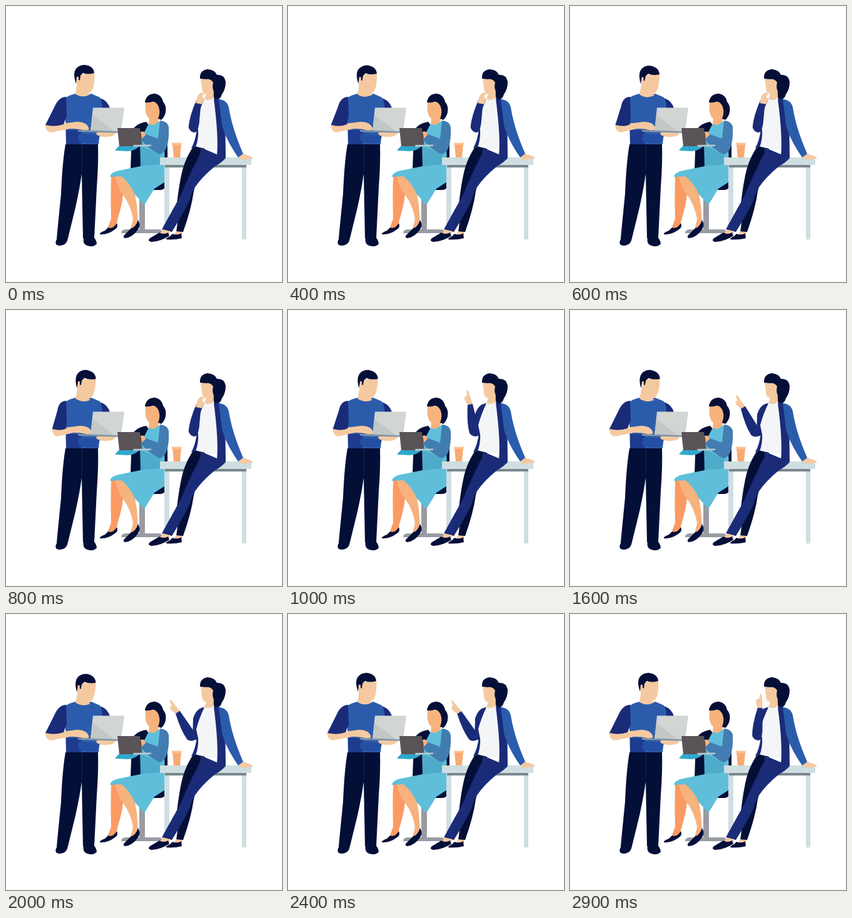
An HTML page for the animation above (3000 ms loop, 441 px wide and 441 px high).

```html
<!DOCTYPE html>
<html lang="en">
<head>
<meta charset="utf-8">
<title>Team at a desk</title>
<style>
html, body { margin: 0; height: 100%; overflow: hidden; background: #fff; }
svg { display: block; width: 100%; height: 100%; }
.ink { fill: #040f38; }
.navy { fill: #1a2b78; }
.shirt { fill: #2b5cab; }
.pale { fill: #f5c9a0; }
.peach { fill: #f7b27d; }
.tan { fill: #fb9b63; }
.steel { fill: #cfdee1; }
.sky { fill: #5fbfda; }
</style>
</head>
<body>
<svg viewBox="0 0 441 441">
  <!-- Standing man -->
  <g>
    <path class="ink" d="M95 221H147Q148 250 145 290L141 371H123L121 268Q118 290 111 322L99 371H81Q84 340 88 300Q90 250 95 221Z"/>
    <path fill="#1d284f" d="M120.500 222H121.500V264H120.500Z"/>
    <path class="ink" d="M82 370H99Q98 382 86 383Q77 382 80 375ZM124 369H140Q145 375 145 380Q140 386 130 383Q122 381 124 369Z"/>
    <path class="navy" d="M148 147Q161 149 166 163H144Z"/>
    <path class="shirt" d="M94 147Q102 142 111 140Q123 147 136 140L150 146Q155 155 154 164L148 221H96Z"/>
    <path fill="#1f3b8f" d="M96 198H120V221H96Z"/>
    <path fill="#2450a3" d="M117 204L151 206L144 219Q130 221 118 217Q113 211 117 204Z"/>
    <g id="head">
      <path class="pale" d="M112 112L141 104Q142 118 140 128Q138 138 131 139L135 141Q123 148 111 141L113 126Z"/>
      <path class="ink" d="M112 124Q106 108 112 100Q117 94 126 94Q140 96 141 107Q131 110 123 107L119 111L118 119L116 118Q117 112 113 113Z"/>
    </g>
    <path class="pale" d="M145 202Q160 198 175 203Q174 208 163 209Q150 210 144 205Z"/>
    <path class="pale" id="forearm"/>
    <path class="navy" id="sleeve"/>
    <path fill="#d1d6d5" d="M139 162.500H189L184 200H135Z"/>
    <path fill="#c2c8c6" d="M138 174L172 200H135Z"/>
    <path fill="#8195a8" d="M114 198L186 200.500V203L116 201Z"/>
  </g>

  <!-- Seated woman -->
  <g>
    <path class="ink" d="M224 185Q202 189 201 205L199 262H224L228 190ZM254 215H258V244H250ZM236 274H254V290Q252 294 245 294H232Z"/>
    <path fill="#989ca2" d="M213 300H222V357H246Q250 358 250 363H184Q184 358 190 357H213Z"/>
    <path class="tan" d="M168 270H188Q189 302 183 324L176 350Q170 356 161 359L168 340Q167 310 168 270Z"/>
    <path class="peach" d="M174 271H194L206 300L209 318L211 344Q208 355 198 362L203 340Q199 318 188 303Q177 290 174 271Z"/>
    <path class="ink" d="M163 354Q171 357 177 347Q180 353 174 357Q162 366 150 365Q149 362 158 359ZM200 355Q207 354 211 342Q216 350 211 357Q202 370 190 371Q185 369 191 364Z"/>
    <path class="sky" d="M228 188Q236 190 245 184L252 190L254 254V281L237 292L221 318L206 301Q196 280 184 272L166 273Q167 266 180 263L215 256L214 215Z"/>
    <path fill="#4eabc9" d="M215 224L246 236L248 253L215 256Z"/>
    <path class="peach" d="M223 154L246 153L244 183Q237 194 228 188L229 180Q221 174 223 154Z"/>
    <path class="ink" d="M222 154Q224 140 238 140Q249 142 251 153Q257 160 255 170Q253 178 248 182L243 180Q247 170 244 161Q240 152 234 153Q228 155 222 154Z"/>
    <path fill="#427db2" d="M246 183Q258 184 260 193Q261 212 257 225Q253 235 246 237Q228 229 216 214L218 203L243 212Z"/>
    <path class="peach" d="M215 201Q222 199 223 206L217 212Z"/>
    <path fill="#2fa9cd" d="M180 224H213Q207 231 194 232L174 231Z"/>
    <path fill="#5a5357" d="M178 195H214L218 224H181Z"/>
    <path fill="#b7c8d1" d="M203 222L232 221.500V224L204 225Z"/>
  </g>

  <!-- Desk and cup -->
  <path class="steel" d="M253 254H261V357H253ZM377 254H384V373H377ZM246 242H392V254H246Z"/>
  <path fill="#78878b" d="M254 254H384V258H254Z"/>
  <path fill="#f9aa72" d="M266 221H280L278 242H268Z"/>
  <path fill="#fbc596" d="M265 218.500H281V222H265Z"/>

  <!-- Woman leaning on the desk -->
  <g>
    <path class="pale" d="M369 238L378 236Q391 239 395 243Q390 246 374 245Z"/>
    <path class="ink" d="M301 222L318 228L300 296Q296 325 283 361H272L277 325L273 316Q277 282 282 262Q288 240 301 222Z"/>
    <path class="navy" d="M311 226L351 243Q345 250 334 256Q312 274 301 291Q295 303 293 311Q286 327 265 361L249 357Q266 326 279 303Q289 278 311 234Z"/>
    <path class="pale" d="M250 357L263 360L259 365L245 366ZM272 360L282 361L280 366L268 367Z"/>
    <path class="ink" d="M245 362Q252 366 259 362L261 367Q248 376 232 377Q225 375 230 371ZM266 364Q274 367 280 363L281 371Q270 374 256 373Q256 370 262 368Z"/>
    <path fill="#f4f5f6" d="M312 151Q322 145 333 148L339 230Q320 229 301 224Q306 205 303 184Z"/>
    <path class="pale" d="M311 113L333 112L332 147Q323 153 317 148L320 141Q313 140 313 130Z"/>
    <path class="ink" d="M310 116Q309 103 322 101Q334 102 337 110Q349 109 351 121Q351 133 345 141Q343 150 334 150Q331 146 332 137Q329 130 331 122Q327 116 319 117Z"/>
    <path class="navy" d="M332 148Q344 148 350 155L351 243L337 239Q340 210 332 148Z"/>
    <path class="navy" d="M305 196Q303 215 296 227L303 226Q308 212 307 198Z"/>
    <path class="shirt" d="M340 149Q353 150 356 162Q361 195 379 236L371 242Q351 213 345 190Z"/>
    <path class="navy" d="M317 149Q304 150 299 167L298 200Q303 203 307 199L304 184Q308 168 317 149Z"/>
    <g id="arm">
      <path class="pale" id="point" d="M298 151L295 140Q296 134 300 136L301 128Q303 126 304 129L305 140L306 151Z"/>
      <path class="navy" d="M298 150L306 150L307 187Q307 198 302 202Q294 202 291 195Q290 178 298 150Z"/>
    </g>
    <path class="pale" id="chin" d="M303 155L306 144L310 139Q316 138 317 141L313 144L317 149L313 157Z"/>
  </g>
</svg>
<script>
const LOOP = 3000, STEP = 100;
const el = id => document.getElementById(id);
const smooth = (t, from, to) => {
  const x = Math.min(1, Math.max(0, (t - from) / (to - from)));
  return x * x * (3 - 2 * x);
};

// The elbow swings out and back while the typing hand follows at half the distance.
function poseTypingArm(t) {
  const e = t < 1550 ? 5.4 * (1 - Math.cos(t / 1550 * 2 * Math.PI)) : 0;
  const h = e * 0.45;
  el('sleeve').setAttribute('d',
    `M96 145Q84 146 ${78 + e * .4} 160L${63 + e} 190Q${78 + e} 194 ${92 + e * .4} 189L97 176Z`);
  el('forearm').setAttribute('d',
    `M${63 + e} 188Q${62 + e} 200 ${71 + e} 202L${103 + h} 196Q${118 + h} 196 ${125 + h} 199
     L${132 + h} 198Q${134 + h} 194 ${127 + h} 188Q${118 + h} 183 ${106 + h} 186L${88 + e * .5} 188Z`);
}

function poseHead(t) {
  const tilt = smooth(t, 100, 850) - smooth(t, 1900, 2400);
  el('head').setAttribute('transform', `translate(0 ${1.6 * tilt}) rotate(${4.5 * tilt} 124 141)`);
}

function posePointingArm(t) {
  const resting = t <= 800;
  let angle = 7;
  if (!resting) {
    angle = -34.5 + 38 * Math.exp((800 - t) / 360);
    angle += (2 - angle) * smooth(t, 2600, 2900);
  }
  el('arm').setAttribute('transform', `rotate(${angle} 300 200)`);
  el('point').style.display = resting ? 'none' : '';
  el('chin').style.display = resting ? '' : 'none';
}

function draw() {
  const t = Math.floor(performance.now() % LOOP / STEP) * STEP;
  poseTypingArm(t);
  poseHead(t);
  posePointingArm(t);
  requestAnimationFrame(draw);
}
draw();
</script>
</body>
</html>
```
